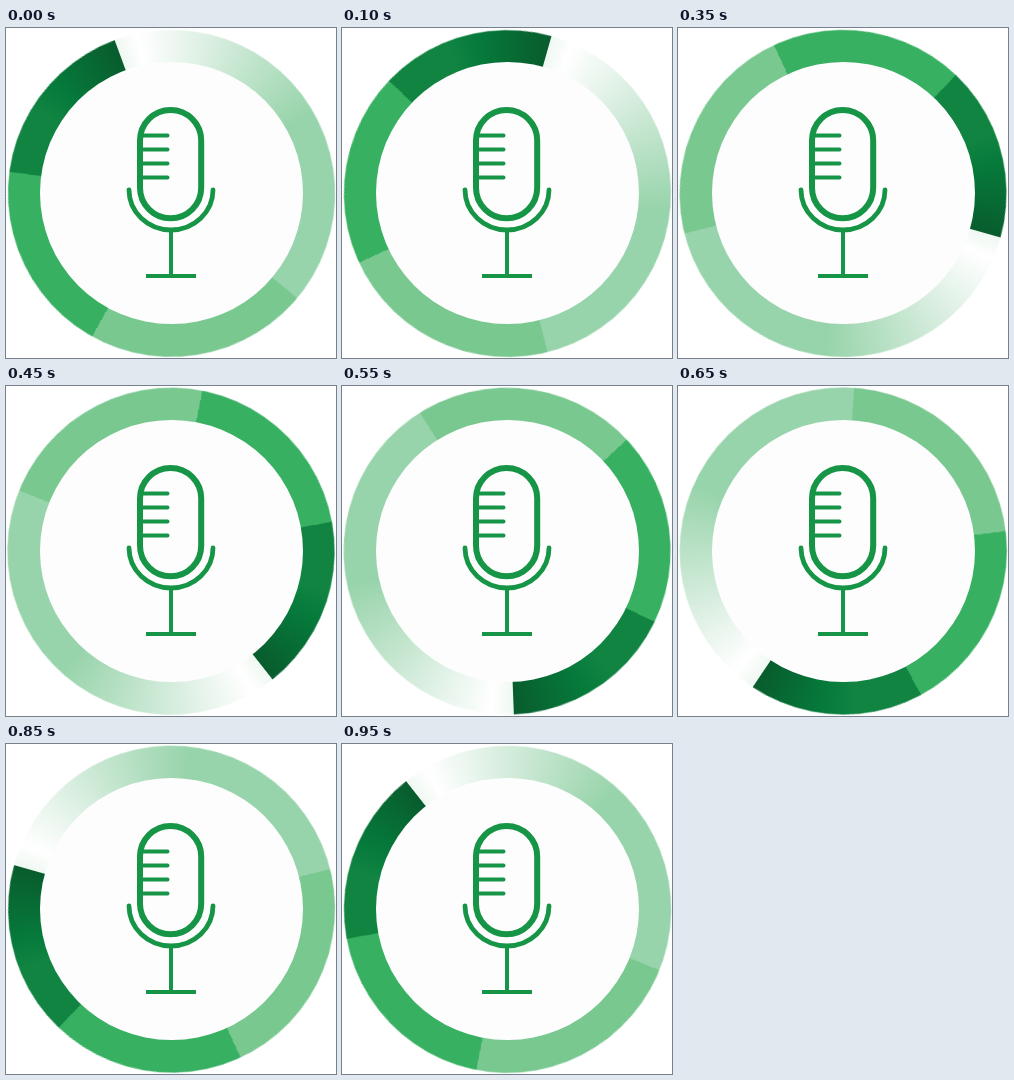
Animation of 330x330 px, one loop 1000 ms. Source, as an HTML page:

```html
<!DOCTYPE html>
<html lang="en">
<head>
<meta charset="utf-8">
<title>Recording</title>
<style>
  html, body {
    margin: 0;
    width: 100%;
    height: 100%;
    overflow: hidden;
    background: #fff;
  }
  .stage {
    position: relative;
    width: 100%;
    height: 100%;
    overflow: clip;
    contain: strict;
  }
  .ring, .face {
    position: absolute;
    border-radius: 50%;
  }
  .ring {
    left: 1.8px;
    top: 1.6px;
    width: 326.6px;
    height: 326.6px;
    background: conic-gradient(
      #f0f8f2 0deg, #fff 8deg, #e9f5ed 24deg, #c3e5ce 50deg, #98d4ab 80deg 150deg,
      #79c890 150deg 229.2deg,
      #38b062 229.2deg 297.8deg,
      #118442 297.8deg 322deg, #067a3b 333deg, #085c2d 360deg);
    animation: spin 1s steps(20) infinite;
  }
  .face {
    left: 33.9px;
    top: 33.6px;
    width: 262.8px;
    height: 262.8px;
    background: #fefdfe;
  }
  svg {
    position: absolute;
    left: 0;
    top: 0;
    fill: none;
    stroke: #169546;
    stroke-width: 4;
  }
  @keyframes spin {
    from { transform: rotate(-20.2deg); }
    to { transform: rotate(339.8deg); }
  }
</style>
</head>
<body>
<div class="stage">
  <div class="ring"></div>
  <div class="face"></div>
  <svg width="330" height="330" viewBox="0 0 330 330">
    <rect x="134" y="81.9" width="61.2" height="108.4" rx="30.6" stroke-width="6"/>
    <path d="M135 107.5H161.5M135 121.5H161.5M135 135.5H161.5M135 149.5H161.5" stroke-linecap="round"/>
    <path d="M123 162A42 40 0 0 0 207 162" stroke-width="4.8" stroke-linecap="round"/>
    <path d="M165 202V248M140 248H190"/>
  </svg>
</div>
</body>
</html>
```
